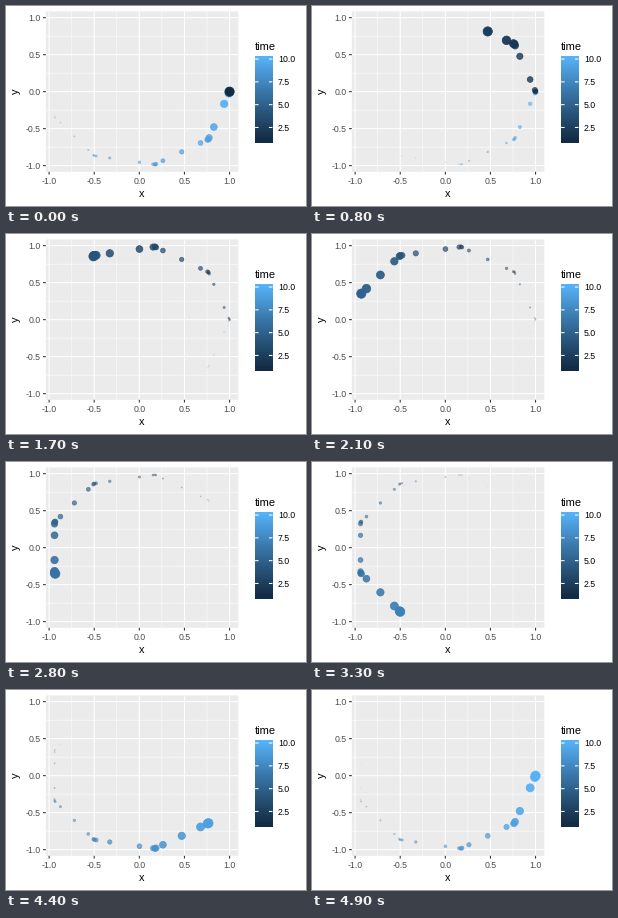
Recreate the animation shown at these times as a matplotlib script. Size 300 by 200 pixels, loop 5000 ms.

```python
import numpy as np
import matplotlib.pyplot as plt
from matplotlib.animation import FuncAnimation
from matplotlib.colors import LinearSegmentedColormap
from matplotlib.patches import Rectangle

WIDTH, HEIGHT, DPI = 300, 200, 100
PT = 72 / DPI  # points per pixel
FRAMES, INTERVAL = 50, 100
WAKE = 25
STATES = 10
POINT_SIZE = 4
STROKE = 0.709

LEFT, RIGHT, TOP, BOTTOM = 39.8, 232.3, 5.5, 165.8
BAR_LEFT, BAR_RIGHT, BAR_TOP, BAR_BOTTOM = 249.1, 266.4, 50.9, 137.3
BINS = 20

plt.rcParams["font.family"] = "Liberation Sans"
blues = LinearSegmentedColormap.from_list("blues", [
    "#132B43", "#1D3F5E", "#28547A", "#336A98", "#3E81B6", "#4A98D6", "#56B1F7"])

# Circle corners, one per state
angles = np.linspace(0, 2 * np.pi, STATES)
corners = np.column_stack([np.cos(angles), np.sin(angles)])


def make_scale(low, high, start, end):
    """Linear map of [low, high], padded by 5 %, onto start..end pixels."""
    pad = 0.05 * (high - low)
    return lambda v: start + (v - low + pad) / (high - low + 2 * pad) * (end - start)


to_x = make_scale(corners[:, 0].min(), 1, LEFT, RIGHT)
to_y = make_scale(corners[:, 1].min(), corners[:, 1].max(), BOTTOM, TOP)


def cubic_in_out(t):
    return 4 * t ** 3 if t < 0.5 else 1 - 4 * (1 - t) ** 3


def state_at(frame):
    """Eased position along the sequence of states, from 0 to 9."""
    keys = np.round(np.arange(STATES) * (FRAMES - 1) / (STATES - 1))
    i = min(np.searchsorted(keys, frame, side="right") - 1, STATES - 2)
    return i + cubic_in_out((frame - keys[i]) / (keys[i + 1] - keys[i]))


path = np.array([state_at(k) for k in range(FRAMES)])
steps = np.arange(STATES)
xs = to_x(np.interp(path, steps, corners[:, 0]))
ys = to_y(np.interp(path, steps, corners[:, 1]))
colors = blues(path / (STATES - 1))

fig = plt.figure(figsize=(WIDTH / DPI, HEIGHT / DPI), dpi=DPI, facecolor="white")
ax = fig.add_axes([0, 0, 1, 1])
ax.axis("off")


def line(x, y, color, width, z):
    ax.plot(x, y, color=color, lw=width * PT, solid_capstyle="butt",
            snap=False, zorder=z)


def text(x, y, label, size, color="black", **kw):
    ax.text(x, y, label, fontsize=size * PT, color=color,
            va=kw.pop("va", "baseline"), **kw)


def draw_panel():
    ax.add_patch(Rectangle((LEFT, TOP), RIGHT - LEFT, BOTTOM - TOP,
                           fc="#EBEBEB", lw=0, snap=False, zorder=0))
    for v in (-0.75, -0.25, 0.25, 0.75):
        line([to_x(v)] * 2, [TOP, BOTTOM], "white", 0.53, 1)
        line([LEFT, RIGHT], [to_y(v)] * 2, "white", 0.53, 1)
    for v in (-1, -0.5, 0, 0.5, 1):
        x, y = to_x(v), to_y(v)
        line([x, x], [TOP, BOTTOM], "white", 1.07, 2)
        line([LEFT, RIGHT], [y, y], "white", 1.07, 2)
        line([x, x], [BOTTOM, BOTTOM + 2.75], "#333333", 1.07, 2)
        line([LEFT - 2.75, LEFT], [y, y], "#333333", 1.07, 2)
        text(x, 177.6, f"{v:.1f}", 8.8, "#4D4D4D", ha="center")
        text(LEFT - 4.95, y + 3.1, f"{v:.1f}", 8.8, "#4D4D4D", ha="right")
    text((LEFT + RIGHT) / 2, 191, "x", 11, ha="center")
    text(13.4, (TOP + BOTTOM) / 2, "y", 11, ha="right", va="center",
         rotation=90, rotation_mode="default") if False else \
        text(13.4, (TOP + BOTTOM) / 2 + 2.75, "y", 11, ha="left",
             rotation=90, rotation_mode="anchor")


def draw_legend():
    text(BAR_LEFT, 43.8, "time", 11)
    ax.imshow(np.linspace(1, 0, BINS)[:, None], cmap=blues, aspect="auto",
              interpolation="bilinear", zorder=1,
              extent=(BAR_LEFT, BAR_RIGHT, BAR_BOTTOM, BAR_TOP))
    half_bin = (BAR_BOTTOM - BAR_TOP) / BINS / 2
    tick = (BAR_RIGHT - BAR_LEFT) / 5
    for v in (2.5, 5, 7.5, 10):
        y = np.interp(v, [1, 10], [BAR_BOTTOM - half_bin, BAR_TOP + half_bin])
        line([BAR_LEFT, BAR_LEFT + tick], [y, y], "white", 1.07, 2)
        line([BAR_RIGHT - tick, BAR_RIGHT], [y, y], "white", 1.07, 2)
        text(BAR_RIGHT + 5.5, y + 3.1, f"{v:.1f}", 8.8)


draw_panel()
draw_legend()
ax.set_xlim(0, WIDTH)
ax.set_ylim(HEIGHT, 0)

# Oldest dot first, so the leading one ends up on top
age = np.arange(WAKE, -1, -1)
strength = 1 - age / (WAKE + 1)
diameters = 0.75 * (POINT_SIZE * strength ** 2 * 2.845 + 0.945)
dots = ax.scatter(np.zeros(WAKE + 1), np.zeros(WAKE + 1),
                  s=(diameters * PT) ** 2, linewidths=STROKE * PT, zorder=3)


def update(frame):
    k = (frame - age) % FRAMES
    rgba = colors[k].copy()
    rgba[:, 3] = strength
    dots.set_offsets(np.column_stack([xs[k], ys[k]]))
    dots.set_facecolor(rgba)
    dots.set_edgecolor(rgba)
    return dots,


anim = FuncAnimation(fig, update, frames=FRAMES, interval=INTERVAL,
                     repeat=True, repeat_delay=0, blit=False)
plt.show()
```
